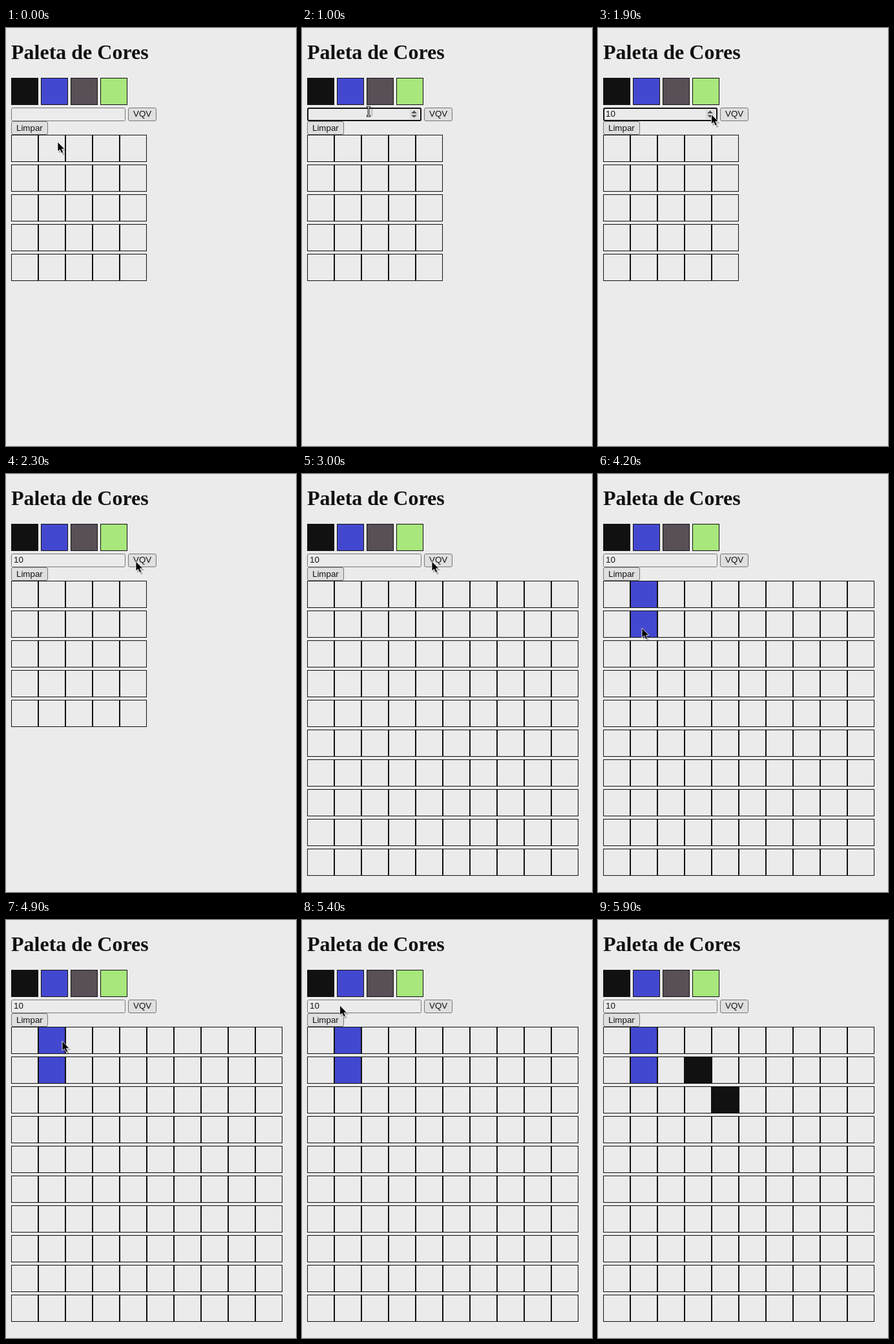
Write an HTML page that moves like this. It is 449 by 646 pixels and loops after 6.1 s.

```html
<!DOCTYPE html>
<html lang="pt">
<head>
<meta charset="utf-8">
<title>Paleta de Cores</title>
<style>
  html, body { margin: 0; width: 449px; height: 646px; overflow: hidden; background: #ebebeb; }
  svg { display: block; }
  text { font: 13.333px "Liberation Sans", Arial, sans-serif; fill: #111; }
  .title { font: bold 32px "Liberation Serif", "Times New Roman", serif; }
  .cell { stroke: #111; }
  .control { stroke: #767676; fill: #dfdfdf; }
</style>
</head>
<body>
<svg width="449" height="646" viewBox="0 0 449 646">
  <text class="title" x="8" y="48">Paleta de Cores</text>
  <g id="palette"></g>

  <rect class="control" x="8.5" y="123.5" width="176" height="20" rx="2" style="fill: #ebebeb"/>
  <g id="focus">
    <rect x="9" y="124" width="175" height="19" rx="2" fill="none" stroke="#151515" stroke-width="2"/>
    <rect x="166" y="126" width="15" height="15" fill="#dedede"/>
    <path d="M169 132l4.5-4.5 4.5 4.5zM169 134.500h9l-4.5 4z" fill="#505050"/>
  </g>
  <text id="value" x="12" y="137"></text>

  <rect class="control" x="189.5" y="123.5" width="43" height="20" rx="2.5"/>
  <text x="197" y="137">VQV</text>
  <rect class="control" x="8.5" y="144.5" width="56" height="20" rx="2.5"/>
  <text x="16" y="159">Limpar</text>

  <g id="grid"></g>

  <g id="cursor">
    <g id="arrow">
      <path d="M2 3v15l3.5-3 2.5 5.5 3-1.300-2.500-5.200h5z" opacity=".25"/>
      <path d="M0 0v15l3.5-3 2.5 5.5 2.7-1.200-2.400-5.200h4.500z" stroke="#fff" stroke-width=".8"/>
    </g>
    <g id="beam" fill="none">
      <path d="M5-4v12" stroke="#000" stroke-width="3" opacity=".15"/>
      <path d="M-3-7h6M0-7v14M-3 7h6" stroke="#222" stroke-width="3"/>
      <path d="M-2-7h4M0-7v14M-2 7h4" stroke="#eee"/>
    </g>
  </g>
</svg>
<script>
const LOOP = 6100, STEP = 100, MOVE = 300;
const COLS = 10, EMPTY = '#ebebeb';
const INKS = ['#111', '#4348d0', '#584f57', '#a7e77c'];
const $ = id => document.getElementById(id);

function addCell(parent, x, y, fill) {
  const rect = document.createElementNS('http://www.w3.org/2000/svg', 'rect');
  const attrs = { class: 'cell', x: x + .5, y: y + .5, width: 41, height: 41, fill };
  for (const name in attrs) rect.setAttribute(name, attrs[name]);
  parent.append(rect);
  return rect;
}

INKS.forEach((fill, i) => addCell($('palette'), 8 + 46 * i, 77, fill));

const cells = Array.from({ length: COLS * COLS }, (_, i) => {
  const row = Math.floor(i / COLS), col = i % COLS;
  return { row, col, rect: addCell($('grid'), 8 + 42 * col, 165 + 46 * row, EMPTY) };
});

const point = (at, x, y) => ({ at, x, y });
const pick = (at, i) => ({ at, x: 26 + 46 * i, y: 95, ink: INKS[i] });
const paint = (at, row, col) => ({ at, x: 26 + 42 * col, y: 192 + 46 * row, cell: row * COLS + col });

// The visitor's moves and clicks, by arrival time
const stops = [
  point(0, 80, 176), point(600, 103, 129), point(2000, 201, 135), point(3500, 43, 173),
  pick(3700, 1), paint(4000, 0, 1), paint(4200, 1, 1),
  point(4900, 87, 187),
  pick(5200, 0), paint(5600, 1, 3), paint(5800, 2, 4)
];

function cursorAt(t) {
  const next = stops.findIndex(s => s.at > t);
  if (next < 0) return stops.at(-1);
  const from = stops[next - 1], to = stops[next];
  const duration = Math.min(MOVE, to.at - from.at);
  const k = Math.max(0, 1 - (to.at - t) / duration);
  const ease = k * k * (3 - 2 * k);
  return { x: from.x + (to.x - from.x) * ease, y: from.y + (to.y - from.y) * ease };
}

// Replays the clicks so far: a swatch sets the ink, a cell takes it
function paintedAt(t) {
  const colours = {};
  let ink;
  for (const stop of stops.filter(s => s.at <= t)) {
    ink = stop.ink || ink;
    if ('cell' in stop) colours[stop.cell] = ink;
  }
  return colours;
}

const show = (node, on) => node.setAttribute('display', on ? 'inline' : 'none');

function render(t) {
  const size = t < 2400 ? 5 : COLS;
  const colours = paintedAt(t);
  cells.forEach(({ row, col, rect }, i) => {
    rect.setAttribute('fill', colours[i] || EMPTY);
    show(rect, row < size && col < size);
  });
  $('value').textContent = '10'.slice(0, Math.max(0, Math.floor((t - 900) / 200)));
  show($('focus'), t >= 600 && t < 2200);

  const { x, y } = cursorAt(t);
  const typing = t >= 600 && t < 1900;
  $('cursor').setAttribute('transform', `translate(${x} ${y})`);
  show($('cursor'), t < 5900);
  show($('arrow'), !typing);
  show($('beam'), typing);
}

const start = performance.now();
function tick() {
  const t = (performance.now() - start) % LOOP;
  render(Math.floor(t / STEP) * STEP);
  requestAnimationFrame(tick);
}
tick();
</script>
</body>
</html>
```
